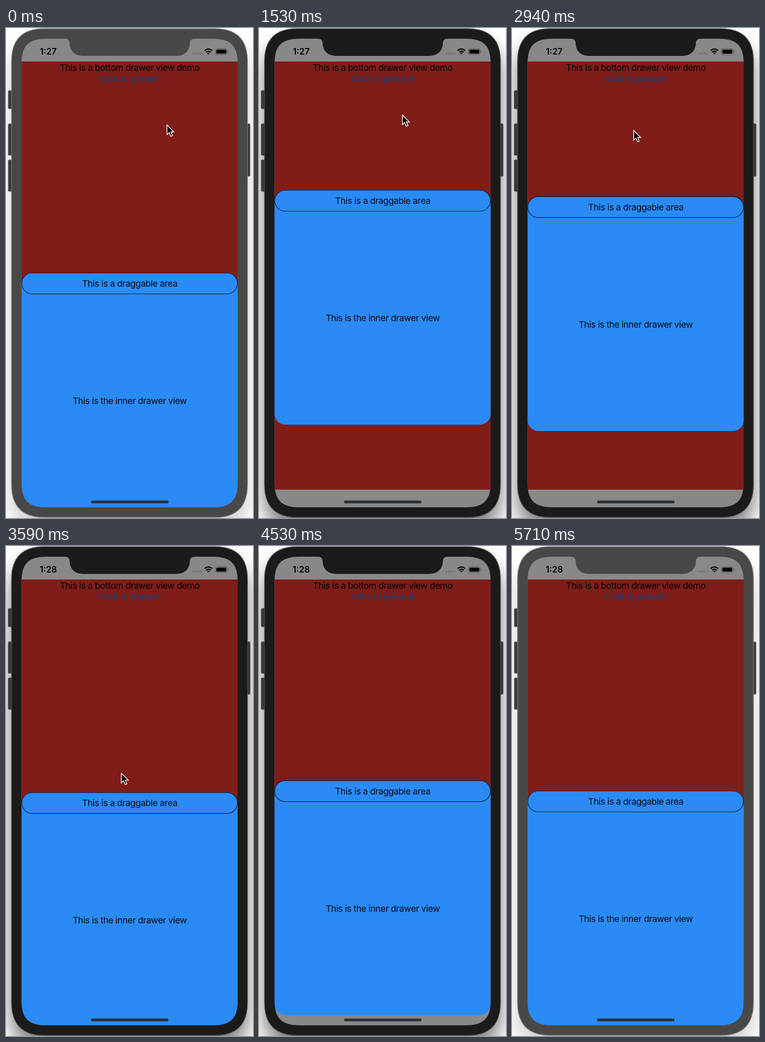
Recreate the animation shown at these times as an HTML page. Size 532x1053 px, loop 6710 ms.

```html
<!DOCTYPE html>
<html lang="en">
<head>
<meta charset="utf-8">
<title>Bottom drawer demo</title>
<style>
  html, body { margin: 0; width: 100%; height: 100%; overflow: hidden; background: #fff; }
  svg { display: block; width: 100vw; height: 100vh; }
  text { font: 19.2px Inter, "Liberation Sans", sans-serif; letter-spacing: -.0255em; text-anchor: middle; }
  #clock { font-size: 18.5px; font-weight: 600; letter-spacing: 0; }
</style>
</head>
<body>
<svg viewBox="0 0 532 1053">
  <defs>
    <clipPath id="screen">
      <path d="M88 23H445C484 23 499 38 499 77V976C499 1015 484 1030 445 1030H88C48 1030 33.5 1015 33.5 976V77C33.5 38 48 23 88 23Z"/>
    </clipPath>
    <filter id="blur" x="-20%" y="-20%" width="140%" height="140%">
      <feGaussianBlur stdDeviation="22"/>
    </filter>
  </defs>

  <rect width="532" height="1053" fill="#fff"/>
  <rect id="shadow" x="12" y="30" width="508" height="1052" rx="68" filter="url(#blur)"/>

  <g id="buttons" fill="#383838" stroke-width="1.5">
    <rect x="5" y="134.5" width="11" height="39" rx="2.5"/>
    <rect x="5" y="206" width="11" height="67.5" rx="2.5"/>
    <rect x="5" y="283.5" width="11" height="67.5" rx="2.5"/>
    <rect x="515" y="206" width="10.5" height="112.5" rx="2.5"/>
  </g>
  <path id="body" stroke-width="1.5" d="M82 1.5H450C496 1.500 520 25 520 72V981C520 1028 496 1051.500 450 1051.500H82C36 1051.500 12 1028 12 981V72C12 25 36 1.500 82 1.500Z"/>

  <g clip-path="url(#screen)">
    <rect x="33" y="23" width="467" height="1008" fill="#888"/>
    <rect x="33" y="72" width="467" height="920" fill="#7f1d19"/>
    <text x="266.500" y="91.500">This is a bottom drawer view demo</text>
    <text x="266.500" y="116" fill="#1b437f">Click to present</text>

    <g id="drawer">
      <rect x="33.500" width="465.500" height="504" rx="23" fill="#2a8bf6"/>
      <rect x="34" y=".5" width="464.500" height="45" rx="22.500" fill="none" stroke="#051226" stroke-width="1.200"/>
      <text x="266.500" y="30" fill="#020811">This is a draggable area</text>
      <text x="266.500" y="282" fill="#020811">This is the inner drawer view</text>
    </g>

    <text id="clock" x="91" y="57">1:27</text>
    <g fill="#757575">
      <circle cx="403.500" cy="55" r="2.300"/>
      <circle cx="409" cy="55" r="2.300"/>
      <circle cx="414.500" cy="55" r="2.300"/>
      <circle cx="420" cy="55" r="2.300"/>
    </g>
    <g fill="none" stroke="#000" stroke-width="2.500">
      <path d="M428 48.500Q436 41.500 444 48.500"/>
      <path d="M431 52Q436 47.500 441 52"/>
    </g>
    <path d="M433 53.800Q436 51.500 439 53.800L436 57Z"/>
    <rect x="451" y="44.500" width="25.500" height="12.500" rx="3.500" fill="none" stroke="#505050"/>
    <rect x="453" y="46.500" width="21.500" height="8.500" rx="2"/>
    <path d="M478 48.500Q481 50.700 478 53Z" fill="#505050"/>
    <rect x="183" y="1015.500" width="167" height="6" rx="3" fill="#2d3036"/>
  </g>
  <path id="notch" d="M126 22H407V23C400 23 396 26 396 33C395 50 385 60 364 60H169C148 60 138 50 137 33C137 26 133 23 126 23Z"/>

  <path id="cursor" d="M.7 1.500V22.200L5.500 17.700L9 25.700L12.500 24.200L9.100 16.400H15.500Z" stroke="#fff" stroke-width="1.600"/>
</svg>

<script>
const LOOP = 6710, ACTIVE = 60, STALL = 5350, END = 5710;
const TICK = 58.8, REST = 526;
const HOME = { x: 346, y: 207 };

// Pointer strokes; those with a release time drag the drawer
const strokes = [
  { from: 190, to: 700, x: 285, y: 541 },
  { from: 885, to: 1610, x: 309, y: 173, release: 1630 },
  { from: 2000, to: 2390, x: 276, y: 547 },
  { from: 2450, to: 3000, x: 261, y: 208, release: 3276 },
  { from: 3276, to: 3700, x: 245, y: 545 },
  { from: 3770, to: 4280, x: 240, y: 867, release: 4330 },
  { from: 4400, to: 4590, x: 245, y: 545 },
  { from: 4650, to: 5000, x: 250, y: 208, release: 5238 },
  { from: 5000, to: 5150, x: 250, y: 240 }
];

const el = id => document.getElementById(id);
const body = el('body'), shadow = el('shadow'), notch = el('notch'), buttons = el('buttons');
const drawer = el('drawer'), cursor = el('cursor'), clock = el('clock');

const ease = u => u * u * (3 - 2 * u);

function pointer(t) {
  let { x, y } = HOME;
  for (const s of strokes) {
    if (t <= s.from) break;
    const e = ease(Math.min(1, (t - s.from) / (s.to - s.from)));
    x += (s.x - x) * e;
    y += (s.y - y) * e;
  }
  return { x, y };
}

function spring(ms) {
  const s = ms / 1000, w = 15.7, k = 9.9;
  return Math.exp(-k * s) * (Math.cos(w * s) + k / w * Math.sin(w * s));
}

// The drawer follows at half speed, then springs back
function drawerTop(t) {
  const drag = strokes.filter(s => s.release && s.from <= t).pop();
  if (!drag) return REST;
  const { from, release } = drag;
  const pull = (pointer(Math.min(t, release)).y - pointer(from).y) / 2;
  return REST + pull * (t < release ? 1 : spring(t - release));
}

function paint(color, rim) {
  body.setAttribute('fill', color);
  notch.setAttribute('fill', color);
  body.setAttribute('stroke', rim);
}

function place(node, x, y) {
  node.setAttribute('transform', `translate(${x.toFixed(2)} ${y.toFixed(2)})`);
}

function draw(time) {
  const active = time >= ACTIVE && time < END;
  const tick = Math.floor((time - 55) / TICK) * TICK + 60;
  const t = time < ACTIVE ? 0 : Math.min(tick, STALL);

  paint(active ? '#1b1b1b' : '#484848', active ? '#4a4a4a' : '#777');
  buttons.setAttribute('stroke', active ? '#484848' : '#6a6a6a');
  shadow.setAttribute('opacity', active ? .54 : .2);

  place(drawer, 0, time >= END ? REST : drawerTop(t));

  const { x, y } = pointer(t);
  const hidden = time >= END || (t > 4380 && t < 4590);
  place(cursor, x, y);
  cursor.setAttribute('visibility', hidden ? 'hidden' : 'visible');
  clock.textContent = time < 3290 ? '1:27' : '1:28';
}

const start = performance.now();
function frame() {
  draw((performance.now() - start) % LOOP);
  requestAnimationFrame(frame);
}
frame();
</script>
</body>
</html>
```
